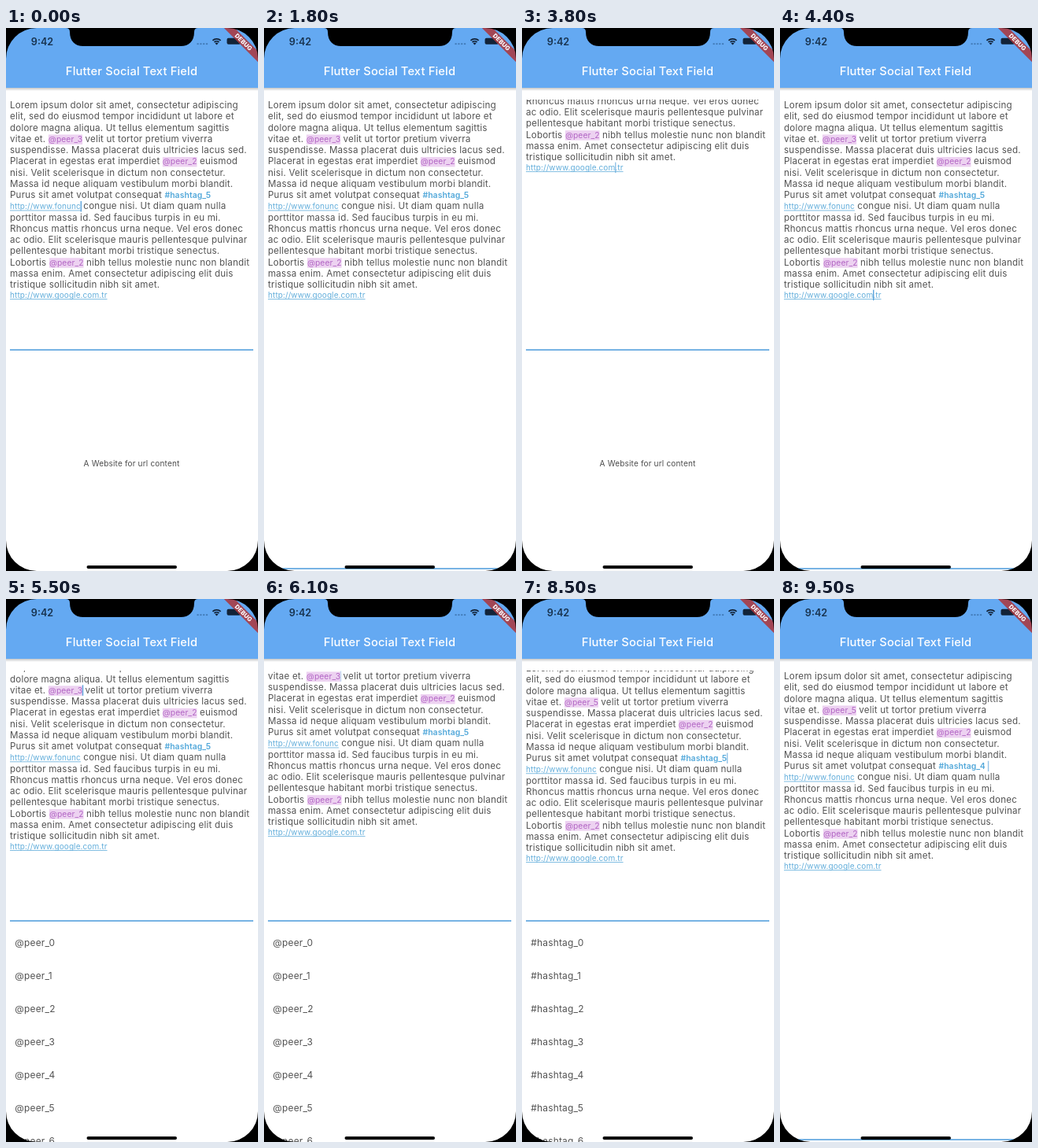
These frames come from a looping animation (320x690 px, 9.6 s). An HTML page with a canvas:

```html
<!DOCTYPE html>
<html lang="en">
<head>
<meta charset="utf-8">
<title>Social text field</title>
<style>
html, body { margin: 0; width: 100%; height: 100%; overflow: hidden; background: #fff; }
canvas { display: block; width: 320px; height: 690px; }
</style>
</head>
<body>
<canvas id="stage"></canvas>
<script>
const W = 320, H = 690, LOOP = 9600;
const canvas = document.getElementById('stage');
const ctx = canvas.getContext('2d');
const dpr = window.devicePixelRatio || 1;
canvas.width = W * dpr;
canvas.height = H * dpr;

const FAMILY = 'Inter, "Open Sans", sans-serif';
const BLUE = '#64a9f2', LINK = '#63aedb', INK = '#535353';
const LEFT = 5, FIRST_BASELINE = 102.2, LINE = 14.25, FIELD_TOP = 91;
const OPEN_Y = 409, CLOSED_Y = 687;

const STYLES = {
  plain: { weight: 400, size: 11.6, spacing: 0.2, color: INK },
  mention: { weight: 400, size: 10.3, spacing: 0.08, color: '#b266c4' },
  tag: { weight: 600, size: 10.4, spacing: 0.08, color: '#52a8da' },
  link: { weight: 400, size: 10, spacing: 0.1, color: LINK },
  item: { weight: 400, size: 11.9, spacing: 0.22, color: INK }
};

const PARAGRAPH = [
  'Lorem ipsum dolor sit amet, consectetur adipiscing',
  'elit, sed do eiusmod tempor incididunt ut labore et',
  'dolore magna aliqua. Ut tellus elementum sagittis',
  'vitae et. @peer_3 velit ut tortor pretium viverra',
  'suspendisse. Massa placerat duis ultricies lacus sed.',
  'Placerat in egestas erat imperdiet @peer_2 euismod',
  'nisi. Velit scelerisque in dictum non consectetur.',
  'Massa id neque aliquam vestibulum morbi blandit.',
  'Purus sit amet volutpat consequat #hashtag_5',
  'http://www.fonunc congue nisi. Ut diam quam nulla',
  'porttitor massa id. Sed faucibus turpis in eu mi.',
  'Rhoncus mattis rhoncus urna neque. Vel eros donec',
  'ac odio. Elit scelerisque mauris pellentesque pulvinar',
  'pellentesque habitant morbi tristique senectus.',
  'Lobortis @peer_2 nibh tellus molestie nunc non blandit',
  'massa enim. Amet consectetur adipiscing elit duis',
  'tristique sollicitudin nibh sit amet.',
  'http://www.google.com.tr'
];

// [start, duration, value]
const SCROLL = [
  [50, 500, 128], [1400, 200, 0], [2437, 500, 72], [3300, 450, 162],
  [4000, 200, 0], [5223, 500, 43], [7100, 200, 0], [8409, 500, 114], [9100, 200, 0]
];
const DIVIDER = [
  [1400, 200, CLOSED_Y], [2000, 200, OPEN_Y], [4000, 200, CLOSED_Y], [5200, 200, OPEN_Y],
  [7100, 200, CLOSED_Y], [8150, 200, OPEN_Y], [9100, 200, CLOSED_Y]
];
// [start, line, text before the caret]
const CARETS = [
  [0, 9, 'http://www.fonunc'],
  [1900, 5, 'Placerat in egestas erat imperdiet @peer_2'],
  [3350, 17, 'http://www.google.com'],
  [5150, 3, 'vitae et. @peer_3'],
  [7100, 3, 'vitae et. @peer_5 '],
  [8050, 8, 'Purus sit amet volutpat consequat #hashtag_5'],
  [9050, 8, 'Purus sit amet volutpat consequat #hashtag_4 ']
];
const PANELS = [[0, 'url'], [1800, '@peer_'], [3300, 'url'], [4600, '@peer_'], [7600, '#hashtag_']];

const clamp = v => Math.max(0, Math.min(1, v));
const ease = u => u * u * (3 - 2 * u);
const latest = (list, t) => list.filter(item => item[0] <= t).pop();

function track(keys, initial, t) {
  return keys.reduce((v, [start, length, to]) =>
    v + (to - v) * ease(clamp((t - start) / length)), initial);
}

function setFont({ weight, size, spacing = 0, color }) {
  ctx.font = `${weight} ${size}px ${FAMILY}`;
  ctx.letterSpacing = spacing + 'px';
  ctx.fillStyle = color;
}

function label(text, x, y, style, align = 'left') {
  setFont(style);
  ctx.textAlign = align;
  ctx.fillText(text, x, y);
  ctx.textAlign = 'left';
}

function runs(line) {
  const kinds = { '@': 'mention', '#': 'tag' };
  let x = LEFT;
  return line.split(/(@\w+|#\w+|http\S+)/).filter(Boolean).map(text => {
    const kind = kinds[text[0]] || (text.startsWith('http') ? 'link' : 'plain');
    setFont(STYLES[kind]);
    const run = { text, kind, x, width: ctx.measureText(text).width };
    x += run.width;
    return run;
  });
}

const baseline = i => FIRST_BASELINE + i * LINE - (i === PARAGRAPH.length - 1 ? 1.3 : 0);

function lineAt(i, t) {
  if (i === 3 && t >= 7100) return PARAGRAPH[i].replace('_3', '_5');
  if (i === 8 && t >= 9050) return PARAGRAPH[i].replace('_5', '_4');
  return PARAGRAPH[i];
}

function drawRun({ text, kind, x, width }, y) {
  if (kind === 'mention') {
    ctx.fillStyle = '#edd2f1';
    ctx.fillRect(x, y - 9.5, width, 12.5);
  }
  label(text, x, y, STYLES[kind]);
  if (kind === 'link') ctx.fillRect(x, y + 1.1, width, 0.8);
}

function drawCaret(t) {
  const [start, line, before] = latest(CARETS, t);
  const phase = (t - start) % 1000;
  const alpha = phase < 500 ? clamp((500 - phase) / 75) : clamp((phase - 925) / 75);
  const last = runs(before).pop();
  ctx.globalAlpha = alpha;
  ctx.fillStyle = '#5ba3db';
  ctx.fillRect(last.x + last.width - 0.3, baseline(line) - 10.5, 1.4, 13.5);
  ctx.globalAlpha = 1;
}

function clipped(top, bottom, draw) {
  ctx.save();
  ctx.beginPath();
  ctx.rect(0, top, W, Math.max(0, bottom - top));
  ctx.clip();
  draw();
  ctx.restore();
}

function drawField(t, bottom) {
  clipped(FIELD_TOP, bottom, () => {
    ctx.translate(0, -track(SCROLL, 0, t));
    PARAGRAPH.forEach((_, i) => runs(lineAt(i, t)).forEach(run => drawRun(run, baseline(i))));
    drawCaret(t);
  });
  ctx.fillStyle = '#69abe2';
  ctx.fillRect(LEFT, bottom - 0.9, 309, 1.8);
}

function drawPanel(t, top) {
  const kind = latest(PANELS, t)[1];
  clipped(top + 1, H, () => {
    ctx.translate(0, top - OPEN_Y);
    if (kind === 'url') {
      label('A Website for url content', 159.5, 557.2,
        { weight: 400, size: 10, spacing: 0.18, color: '#4c4c4c' }, 'center');
      return;
    }
    for (let i = 0; i < 7; i++) label(kind + i, 11.3, 440.6 + i * 42, STYLES.item);
  });
}

function drawHeader() {
  const shadow = ctx.createLinearGradient(0, 76, 0, 80);
  shadow.addColorStop(0, 'rgba(0,0,0,.22)');
  shadow.addColorStop(1, 'rgba(0,0,0,0)');
  ctx.fillStyle = shadow;
  ctx.fillRect(0, 76, W, 4);
  ctx.fillStyle = BLUE;
  ctx.fillRect(0, 0, W, 76);
  label('Flutter Social Text Field', 159.5, 60.4,
    { weight: 500, size: 14.7, spacing: 0.15, color: '#fff' }, 'center');
  label('9:42', 46, 21.6, { weight: 600, size: 12.6, color: '#18334f' }, 'center');
  drawStatusIcons();
  drawBanner();
}

function drawStatusIcons() {
  ctx.fillStyle = '#4079b5';
  for (let i = 0; i < 4; i++) ctx.fillRect(242.5 + i * 3.8, 19.3, 2.2, 1.8);
  ctx.strokeStyle = ctx.fillStyle = '#122338';
  ctx.lineWidth = 1.7;
  for (const r of [4.2, 7.2]) {
    ctx.beginPath();
    ctx.arc(267.5, 21, r, -Math.PI * 0.75, -Math.PI * 0.25);
    ctx.stroke();
  }
  ctx.beginPath();
  ctx.moveTo(267.5, 21.5);
  ctx.arc(267.5, 21.5, 2.8, -Math.PI * 0.75, -Math.PI * 0.25);
  ctx.fill();
  ctx.beginPath();
  ctx.roundRect(280.5, 12.8, 17.5, 8, 2);
  ctx.fill();
}

function drawBanner() {
  ctx.save();
  ctx.translate(301.6, 18);
  ctx.rotate(Math.PI / 4);
  ctx.fillStyle = 'rgba(171,58,64,.88)';
  ctx.fillRect(-34, -4.8, 68, 9.6);
  label('DEBUG', 0, 2.7, { weight: 800, size: 7.7, spacing: 0.1, color: '#fff' }, 'center');
  ctx.restore();
}

function drawBezel() {
  ctx.fillStyle = '#000';
  ctx.beginPath();
  ctx.rect(0, 0, W, H);
  ctx.roundRect(0, 0, W, H, 39);
  ctx.fill('evenodd');
  ctx.beginPath();
  ctx.moveTo(76, 0);
  ctx.quadraticCurveTo(81, 0, 81, 5);
  ctx.bezierCurveTo(81, 17, 88, 23, 98, 23);
  ctx.lineTo(222, 23);
  ctx.bezierCurveTo(232, 23, 239, 17, 239, 5);
  ctx.quadraticCurveTo(239, 0, 244, 0);
  ctx.fill();
  ctx.beginPath();
  ctx.roundRect(102.5, 683, 114.5, 4, 2);
  ctx.fill();
}

function render(now) {
  const t = now % LOOP;
  const divider = track(DIVIDER, OPEN_Y, t);
  ctx.setTransform(dpr, 0, 0, dpr, 0, 0);
  ctx.fillStyle = '#fff';
  ctx.fillRect(0, 0, W, H);
  drawField(t, divider);
  drawPanel(t, divider);
  drawHeader();
  drawBezel();
}

const origin = performance.now();
function tick() {
  render(performance.now() - origin);
  requestAnimationFrame(tick);
}
tick();
</script>
</body>
</html>
```
